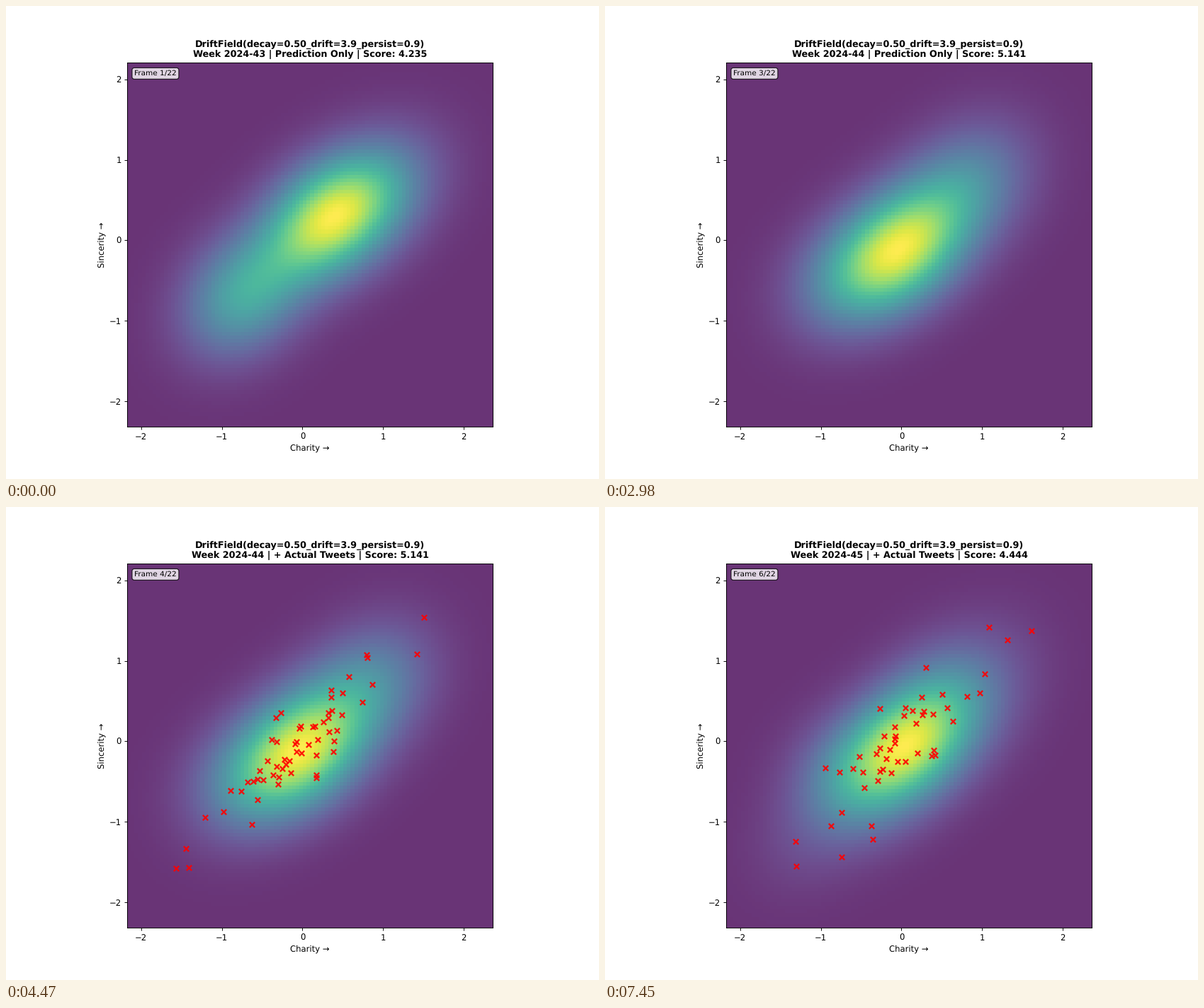
Write a matplotlib script that moves like this. It is 837 by 669 pixels and loops after 8000 ms.

```python
import numpy as np
import matplotlib.pyplot as plt
from matplotlib.animation import FuncAnimation

DPI = 83.7
WIDTH, HEIGHT = 837, 669
LOOP, STEP, HOLD = 8000, 40, 1490
XLIM, YLIM = (-2.176, 2.36), (-2.319, 2.2056)
CELLS = 100

plt.rcParams["text.hinting"] = "no_hinting"

# Each bump: x, y, height, spread along, spread across, angle.
# The cloud: point count, centre along the diagonal, spread along, spread across.
WEEKS = [
    dict(score=4.235,
         bumps=[(0.26, 0.21, 0.75, 0.61, 0.45, 43),
                (0.85, 0.57, 0.40, 0.63, 0.46, 40),
                (-0.75, -0.70, 0.50, 0.58, 0.46, 49)],
         cloud=(55, -0.05, 0.72, 0.22),
         far=[(1.49, 1.15), (1.04, 1.26), (-1.44, -0.85),
              (-0.845, -1.175), (-0.21, -0.875)]),
    dict(score=5.141,
         bumps=[(0.01, -0.09, 0.80, 0.60, 0.46, 42),
                (0.80, 0.66, 0.36, 0.62, 0.48, 46),
                (-0.65, -0.50, 0.34, 0.58, 0.47, 38)],
         cloud=(56, -0.10, 0.72, 0.22),
         far=[(1.505, 1.54), (0.80, 1.04), (-1.41, -1.57), (-1.57, -1.58)]),
    dict(score=4.444,
         bumps=[(0.05, -0.07, 0.75, 0.55, 0.45, 42),
                (0.62, 0.50, 0.33, 0.55, 0.49, 45),
                (-0.60, -0.52, 0.36, 0.53, 0.49, 45),
                (1.20, 1.05, 0.05, 0.55, 0.50, 45),
                (-1.20, -1.25, 0.07, 0.55, 0.45, 45)],
         cloud=(46, -0.02, 0.72, 0.24),
         far=[(1.61, 1.375), (1.31, 1.26), (-1.305, -1.55),
              (-0.745, -1.435), (-0.36, -1.215)]),
]


def density(bumps):
    gx, gy = np.meshgrid(np.linspace(*XLIM, CELLS), np.linspace(*YLIM, CELLS))
    total = np.zeros_like(gx)
    for x, y, height, along, across, angle in bumps:
        c, s = np.cos(np.radians(angle)), np.sin(np.radians(angle))
        u = ((gx - x) * c + (gy - y) * s) / along
        v = ((gy - y) * c - (gx - x) * s) / across
        total += height * np.exp(-0.5 * (u * u + v * v))
    return total / total.max()


def scatter_points(seed, cloud, far):
    """Points spread evenly along the diagonal, with random side offsets."""
    count, centre, along, across = cloud
    rng = np.random.default_rng(seed)
    p = (np.arange(count) + 0.5) / count
    u = centre + 0.55 * along * np.log(p / (1 - p))
    v = np.clip(rng.normal(0, across, count), -2 * across, 2 * across)
    return np.vstack([np.column_stack([u - v, u + v]) / np.sqrt(2), far])


fields = [density(w["bumps"]) for w in WEEKS]
points = [scatter_points(n, w["cloud"], w["far"]) for n, w in enumerate(WEEKS)]

# The small margin keeps rounding from dropping a pixel
fig, ax = plt.subplots(
    figsize=((WIDTH + 1e-3) / DPI, (HEIGHT + 1e-3) / DPI), dpi=DPI)
image = ax.imshow(fields[0], extent=(*XLIM, *YLIM), origin="lower",
                  cmap="viridis", alpha=0.8, vmin=0, vmax=1, aspect="equal")
marks = ax.scatter([], [], c="red", marker="x", s=40, linewidths=2, alpha=0.9)
ax.set(xlim=XLIM, ylim=YLIM, xlabel="Charity →", ylabel="Sincerity →",
       xticks=range(-2, 3), yticks=range(-2, 3))
title = ax.set_title("", fontsize=11, fontweight="bold", linespacing=1.25)
label = ax.text(0.02, 0.98, "", transform=ax.transAxes, fontsize=9, va="top",
                bbox=dict(boxstyle="round", facecolor="white", alpha=0.8))


def update(i):
    page = (i * STEP + 30) // HOLD
    week, actual = divmod(page, 2)
    image.set_data(fields[week])
    marks.set_offsets(points[week] if actual else np.empty((0, 2)))
    kind = "+ Actual Tweets" if actual else "Prediction Only"
    score = WEEKS[week]["score"]
    title.set_text("DriftField(decay=0.50_drift=3.9_persist=0.9)\n"
                   f"Week 2024-{43 + week} | {kind} | Score: {score:.3f}")
    label.set_text(f"Frame {page + 1}/22")
    return image, marks, title, label


anim = FuncAnimation(fig, update, frames=LOOP // STEP, interval=STEP,
                     init_func=lambda: update(0), repeat=True, repeat_delay=0)
plt.show()
```
